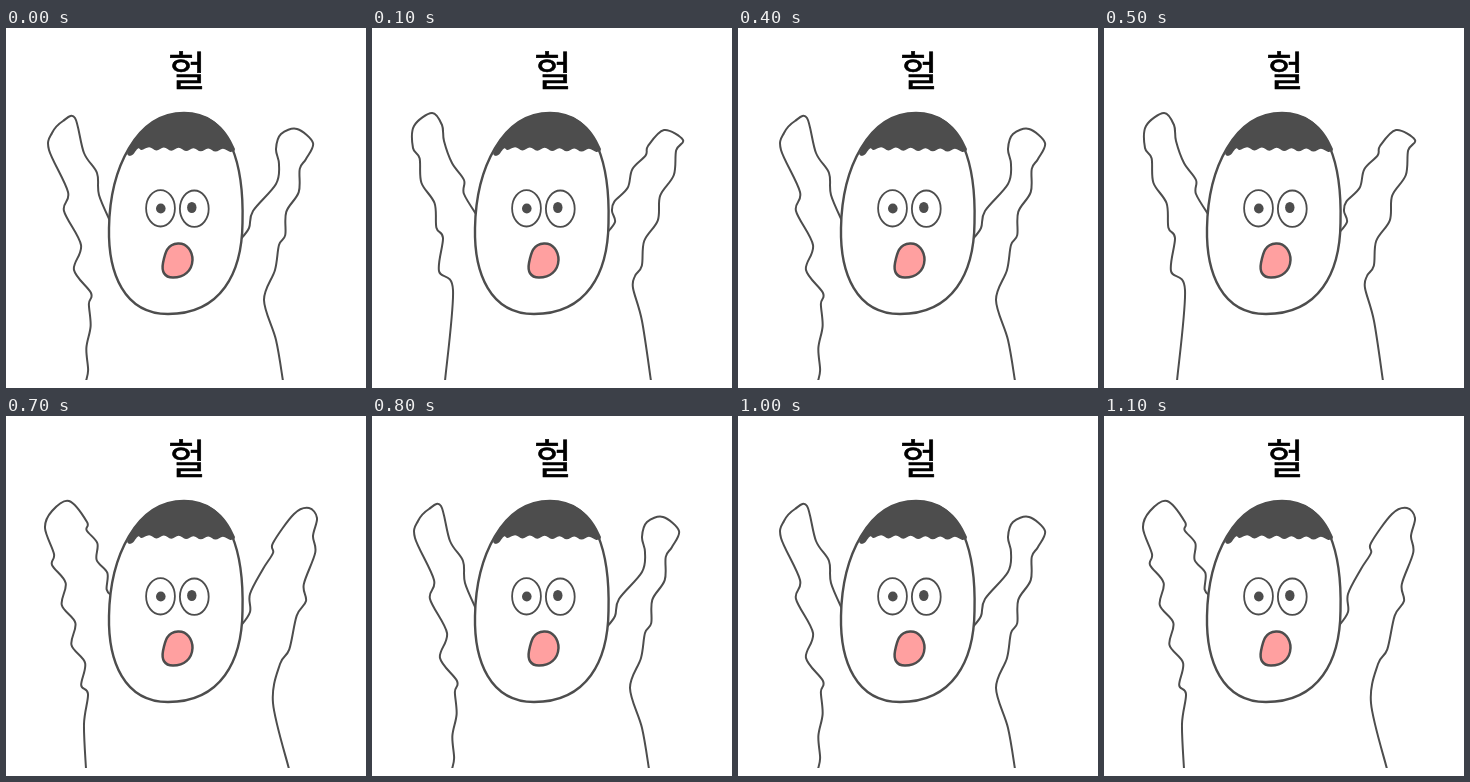
Recreate the animation shown at these times as an HTML page. Size 360 by 360 pixels, loop 1.2 s.

```html
<!DOCTYPE html>
<html lang="ko">
<head>
<meta charset="utf-8">
<style>
  html, body { margin: 0; width: 100%; height: 100%; overflow: hidden; background: #fff; }
  svg { display: block; width: 100%; height: 100%; }
  text { font: 41px "Noto Sans CJK KR", "Noto Sans CJK", sans-serif; text-anchor: middle; }
</style>
</head>
<body>
<svg viewBox="0 0 360 360" fill="none" stroke="#4d4d4d" stroke-width="2" stroke-linejoin="round">
  <clipPath id="floor"><path d="M0 0H360V352H0z"/></clipPath>
  <text x="181" y="58" fill="#000" stroke="#000" stroke-width=".6">헐</text>
  <path id="arms" clip-path="url(#floor)"/>
  <path fill="#fff" stroke-width="2.4" d="M103 200C104 141 130 85 178 85C226 85 238 140 236.5 195C236 245 215 286 162 286C118 286 102 245 103 200z"/>
  <path id="hair" fill="#4d4d4d" stroke="none"/>
  <g stroke-width="1.8">
    <ellipse cx="154.5" cy="180.3" rx="14.4" ry="18.2"/>
    <ellipse cx="188.3" cy="180.7" rx="14.4" ry="18.2"/>
  </g>
  <g fill="#4d4d4d" stroke="none">
    <ellipse cx="154.8" cy="180.5" rx="4.8" ry="5.1"/>
    <ellipse cx="185.8" cy="179.5" rx="4.7" ry="5.5"/>
  </g>
  <path fill="#ffa0a0" stroke-width="2.5" d="M172 215.5C181 215 186.5 223 186.5 232C186 243 178 249.5 167 249.5C158 249.5 155.5 243 157 235C159 225 161 216 172 215.5z"/>
</svg>
<script>
// Reads "x,y" key points; "x,y,count,size" reaches its point through
// that many bumps, alternating to both sides of the straight way.
function trace(text) {
  const pts = [];
  for (const key of text.split(' ')) {
    const [x, y, count = 0, size = 0] = key.split(',').map(Number);
    const [x0, y0] = pts.at(-1) || [x, y];
    const dx = x - x0, dy = y - y0, len = Math.hypot(dx, dy);
    for (let i = 0; i < count; i++) {
      const t = (i + 0.5) / count, off = (i % 2 ? -size : size) / len;
      pts.push([x0 + dx * t - dy * off, y0 + dy * t + dx * off]);
    }
    pts.push([x, y]);
  }
  return pts;
}

// Catmull-Rom curve through the traced points
function curve(text) {
  const pts = trace(text);
  const at = i => pts[Math.max(0, Math.min(pts.length - 1, i))];
  let d = 'M' + pts[0];
  for (let i = 0; i < pts.length - 1; i++) {
    const [a, b, c, e] = [at(i - 1), at(i), at(i + 1), at(i + 2)];
    const c1 = b.map((v, k) => v + (c[k] - a[k]) / 6);
    const c2 = c.map((v, k) => v - (e[k] - b[k]) / 6);
    d += `C${c1} ${c2} ${c}`;
  }
  return d;
}

const pose = (left, right) => curve(left) + curve(right);

const middle = pose(
  '80,353 85,265,4,1.5 68,242 75,217 58,183 62,164 43,122 46,105 57,93 69,90 78,125 91,145 93,167 105,195',
  '234,212 243,200 247,183 270,156 273,136 270,121 275,106 291,101 307,115 300,131 273,217,4,3 269,242 258,272 270,312 277,353');

const outward = pose(
  '73,353 81,262 67,243 71,210 41,120,4,-3 42,98 60,85 70,97 72,113 80,135 92,152 92,166 106,189',
  '234,206 243,194 240,183 276,118,4,-2.5 292,102 311,112 263,248,6,3 261,260 270,293 279,353');

const upward = pose(
  '80,353 78,308 82,278 48,138,7,-4.5 39,112 46,95 63,85 81,106 106,180,5,3',
  '234,211 244,196 244,178 257,153 267,137 267,127 288,98 303,92 311,102 307,120 300,185,2,-4 274,248,2,3 267,287 283,353');

const find = id => document.getElementById(id);
find('hair').setAttribute('d',
  curve('123,128 127,126.5 132,120.5 228,122.5,13,1.5 228,125')
  + 'L229 121C219 97 203 85 178 85C150 85 131 103 121 126z');

const poses = [middle, outward, middle, upward];
const start = performance.now();
let shown;
function draw() {
  const step = Math.floor((performance.now() - start) / 100) % poses.length;
  if (step !== shown) find('arms').setAttribute('d', poses[shown = step]);
  requestAnimationFrame(draw);
}
draw();
</script>
</body>
</html>
```
